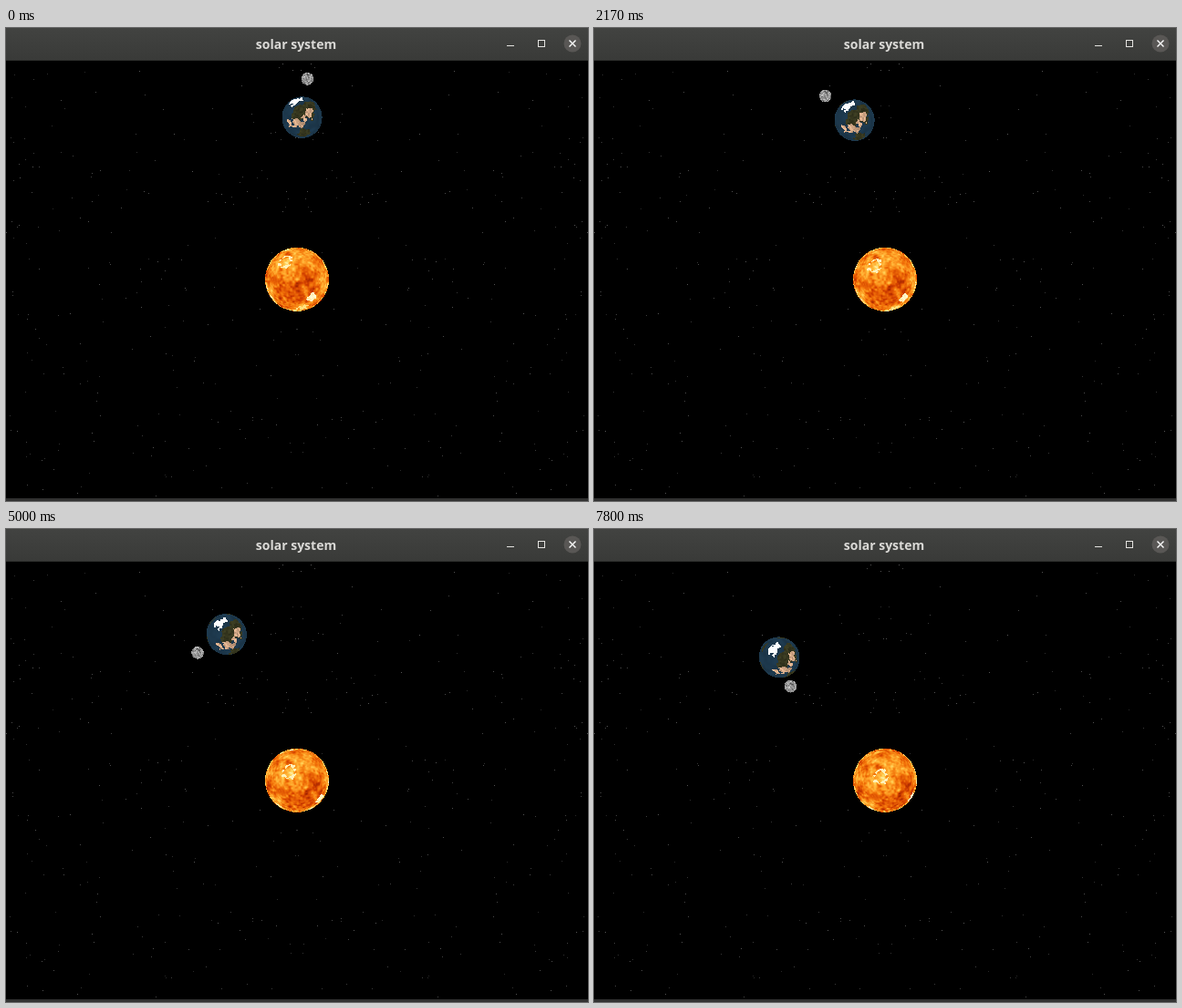
Recreate the animation shown at these times as an HTML page with a canvas. Size 638 by 519 pixels, loop 8 s.

```html
<!DOCTYPE html>
<html lang="en">
<head>
<meta charset="utf-8">
<title>solar system</title>
<style>
  html, body { margin: 0; width: 100%; height: 100%; overflow: hidden; background: #000; }
  canvas { display: block; }
</style>
</head>
<body>
<canvas id="stage" width="638" height="519"></canvas>
<script>
const ctx = document.getElementById('stage').getContext('2d');
const { sin, cos, floor, hypot, sqrt, exp, max, min } = Math;
const LOOP = 8000;
const CX = 319, CY = 276;

// The simulation advances at these uneven moments (ms).
const TICKS = [30, 250, 470, 700, 900, 1100, 1330, 1530, 1770, 1970, 2170, 2400,
  2600, 2830, 3030, 3230, 3470, 3700, 3930, 4170, 4400, 4600, 4800, 5000, 5230,
  5470, 5670, 5870, 6100, 6300, 6730, 6930, 7150, 7370, 7600, 7800];
const SKIP_AT = 6730; // two steps happen at once here

const stepAt = t => TICKS.filter(k => k <= t).length + (t >= SKIP_AT ? 1 : 0);

// ---- noise and colour helpers ----
const lerp = (a, b, f) => a + (b - a) * f;
const mix = (a, b, f) => a.map((v, i) => lerp(v, b[i], f));

function hash(x, y, z) {
  const h = sin(x * 127.1 + y * 311.7 + z * 74.7) * 43758.5453;
  return h - floor(h);
}

function noise(p, scale) {
  const [x, y, z] = p.map(v => v * scale + 50);
  const i = floor(x), j = floor(y), k = floor(z);
  const ease = f => f * f * (3 - 2 * f);
  const u = ease(x - i), v = ease(y - j), w = ease(z - k);
  const row = (b, c) => lerp(hash(i, b, c), hash(i + 1, b, c), u);
  const face = c => lerp(row(j, c), row(j + 1, c), v);
  return lerp(face(k), face(k + 1), w) - 0.5;
}

function ramp(stops, f) {
  const s = max(0, min(0.9999, f)) * (stops.length - 1);
  return mix(stops[floor(s)], stops[floor(s) + 1], s % 1);
}

// Distance from p to the front-side surface point above (x, y).
const dist = (p, x, y) =>
  hypot(p[0] - x, p[1] - y, p[2] - sqrt(max(0, 1 - x * x - y * y)));
const glow = (p, x, y, r) => exp(-((dist(p, x, y) / r) ** 2));

// ---- surfaces, described on the unit sphere at step 0 ----
const FIRE = [[150, 28, 0], [212, 66, 0], [243, 116, 10], [255, 168, 44],
  [255, 216, 96], [255, 250, 215]];

function sunColor(p, rim) {
  const grain = noise(p, 17);
  let heat = 0.43 + 0.4 * noise(p, 4) + 0.36 * noise(p, 10) + 0.28 * grain;
  heat += 0.2 * glow(p, -0.3, -0.55, 0.65) - 0.2 * glow(p, -0.3, 0.25, 0.5)
    - 0.12 * glow(p, 0.25, 0.2, 0.4);
  const ring = dist(p, -0.37, -0.57) + 0.12 * noise(p, 9);
  if (ring > 0.15 && ring < 0.23 && grain > -0.12) heat = 0.95;
  if (dist(p, 0.46, 0.58) + 0.16 * noise(p, 8) < 0.17) heat = 0.96 + grain * 0.2;
  if (dist(p, 0.15, 0.9) + 0.3 * grain < 0.14) heat = 0.85;
  if (rim > 0.96 && grain > 0) heat += 0.25;
  return ramp(FIRE, heat);
}

const SEA = [29, 56, 76], GREEN = [54, 55, 31], TAN = [203, 162, 130];
const LAND = [
  [0, -0.25, 0.4], [0.42, -0.55, 0.38], [-0.2, -0.05, 0.3], [0.1, 0.75, 0.3], [0.45, -0.1, 0.25]
];
const DESERT = [
  [0.36, -0.3, 0.17], [0.42, -0.08, 0.17], [0.16, 0.1, 0.16],
  [-0.32, 0.28, 0.22], [-0.04, 0.3, 0.19], [-0.62, 0.3, 0.15]
];
const ICE = [[-0.4, -0.74, 0.23], [-0.18, -0.86, 0.17]];

function earthColor(p) {
  const coast = 0.3 * noise(p, 6) + 0.16 * noise(p, 14);
  const inside = spots => spots.some(([x, y, r]) => dist(p, x, y) + coast < r);
  const shade = 1 + 0.5 * noise(p, 12);
  if (inside(ICE)) return [252, 253, 254];
  if (inside(DESERT)) return TAN.map(v => v * shade);
  if (inside(LAND) || (p[2] < 0 && noise(p, 2.5) > 0.06)) return GREEN.map(v => v * shade);
  return SEA.map(v => v * (1 + 0.2 * noise(p, 5)));
}

function moonColor(p) {
  const g = 146 + 130 * noise(p, 5) + 90 * noise(p, 9);
  return [g, g, g];
}

// ---- spheres ----
const AXIS = [0.62, -0.6, 0.51];

function spin(p, a) {
  const [x, y, z] = p, [ax, ay, az] = AXIS;
  const c = cos(a), s = sin(a), d = (ax * x + ay * y + az * z) * (1 - c);
  return [
    x * c + (ay * z - az * y) * s + ax * d,
    y * c + (az * x - ax * z) * s + ay * d,
    z * c + (ax * y - ay * x) * s + az * d
  ];
}

// Spheres away from the centre are stretched outwards by the perspective.
function sphere(cx, cy, r, stretch, turn, color) {
  const far = hypot(cx - CX, cy - CY) || 1;
  const ux = (cx - CX) / far, uy = (cy - CY) / far;
  const reach = r * stretch + 1;
  for (let py = floor(cy - reach); py <= cy + reach; py++) {
    for (let px = floor(cx - reach); px <= cx + reach; px++) {
      const dx = px + 0.5 - cx, dy = py + 0.5 - cy;
      const pull = (dx * ux + dy * uy) * (1 / stretch - 1);
      const x = (dx + ux * pull) / r, y = (dy + uy * pull) / r;
      const q = x * x + y * y;
      if (q > 1) continue;
      const rgb = color(spin([x, y, sqrt(1 - q)], turn), sqrt(q));
      ctx.fillStyle = `rgb(${rgb.map(v => max(0, min(255, v)) | 0)})`;
      ctx.fillRect(px, py, 1, 1);
    }
  }
}

// ---- backdrop and window frame ----
function stars() {
  let seed = 41;
  const rnd = () => (seed = (seed * 16807) % 2147483647) / 2147483647;
  for (let i = 0; i < 215; i++) {
    const x = floor(rnd() * 319), y = 37 + floor(rnd() * 478);
    const g = 38 + floor(rnd() * 48);
    ctx.fillStyle = `rgb(${g},${g},${g})`;
    ctx.fillRect(x, y, 1, 1);
    ctx.fillRect(637 - x, y, 1, 1);
  }
}

function titleBar() {
  const bar = ctx.createLinearGradient(0, 0, 0, 36);
  bar.addColorStop(0, '#424341');
  bar.addColorStop(1, '#393a38');
  ctx.fillStyle = bar;
  ctx.fillRect(0, 0, 638, 36);
  ctx.fillStyle = '#2b2c2a';
  ctx.fillRect(0, 35, 638, 1);
  ctx.fillStyle = '#313130';
  ctx.fillRect(0, 516, 638, 3);

  ctx.fillStyle = '#dad9d6';
  ctx.font = 'bold 14px "Open Sans", sans-serif';
  ctx.textAlign = 'center';
  ctx.fillText('solar system', 318, 23);

  ctx.fillStyle = '#e4e3e0';
  ctx.fillRect(549, 19, 8, 1);
  ctx.strokeStyle = '#e4e3e0';
  ctx.lineWidth = 1;
  ctx.strokeRect(583.5, 13.5, 7, 7);

  ctx.fillStyle = '#595755';
  ctx.beginPath();
  ctx.arc(621, 17, 9.5, 0, 7);
  ctx.fill();
  ctx.strokeStyle = '#fff';
  ctx.lineWidth = 1.4;
  ctx.beginPath();
  ctx.moveTo(617.5, 13.5); ctx.lineTo(624.5, 20.5);
  ctx.moveTo(624.5, 13.5); ctx.lineTo(617.5, 20.5);
  ctx.stroke();
}

function draw(n) {
  ctx.fillStyle = '#000';
  ctx.fillRect(0, 0, 638, 519);
  stars();
  titleBar();

  const turn = 0.0175 * n;
  const year = 0.031 - 0.02 * n, month = 0.15 - 0.1 * n;
  const ux = sin(year), uy = -cos(year);
  sphere(CX, CY - 0.2, 35, 1, turn, sunColor);
  sphere(CX + 178 * ux, CY + 178 * uy, 22, 1.035, turn, earthColor);
  sphere(CX + 182.4 * ux + 38.3 * sin(month), CY + 182.4 * uy - 38.3 * cos(month),
    6.7, 1.03, turn, moonColor);
}

let shown = -1;
function tick() {
  const n = stepAt(performance.now() % LOOP);
  if (n !== shown) draw(shown = n);
  requestAnimationFrame(tick);
}
tick();
</script>
</body>
</html>
```
